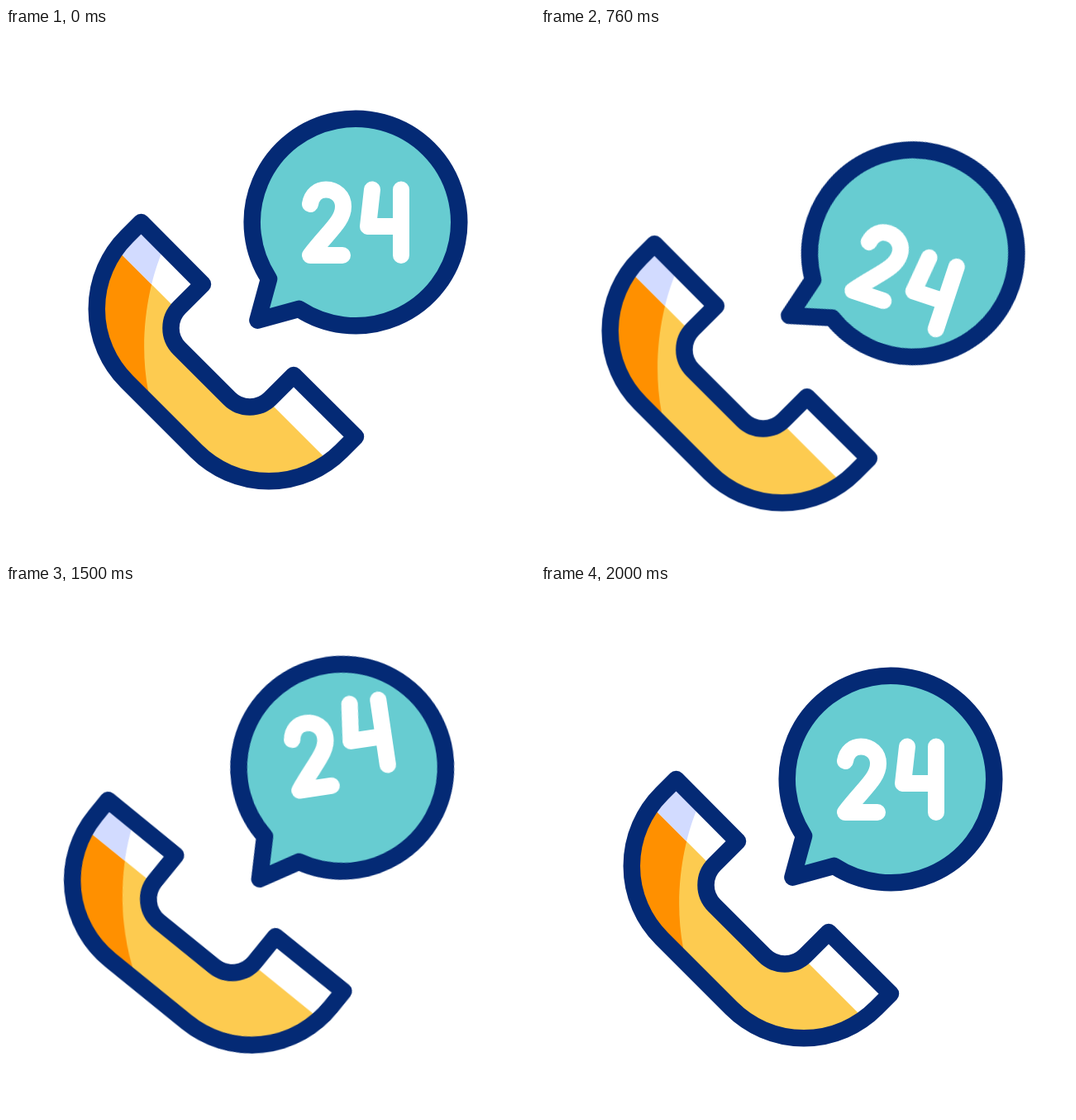
An HTML page without scripts for the animation above (2.22 s loop, 640 by 640 pixels).

```html
<!DOCTYPE html>
<html lang="en">
<head>
<meta charset="utf-8">
<title>Support around the clock</title>
<style>
  html, body { margin: 0; height: 100%; overflow: hidden; background: #fff; }
  svg { display: block; width: 100vw; height: 100vh; }

  .line {
    fill: none; stroke: #042a75; stroke-width: 20.5;
    stroke-linejoin: round; stroke-linecap: round;
  }
  .digit {
    fill: none; stroke: #fff; stroke-width: 20;
    stroke-linejoin: round; stroke-linecap: round;
  }

  .move { animation: 2220ms cubic-bezier(.333, 0, .667, 1) infinite; }
  .bubble { transform-origin: 320px 338px; animation-name: sway; }
  .two { animation-name: two; }
  .four { animation-name: four; }
  .slide { animation-name: slide; animation-timing-function: cubic-bezier(.4, 0, .6, 1); }
  .ring { transform-origin: 215px 443px; animation-name: ring; }

  @keyframes sway {
    0%, 90.09%, 100% { transform: rotate(0deg); }
    30.03% { transform: rotate(20deg); }
    60.06% { transform: rotate(-10deg); }
  }
  @keyframes two {
    0%, 81.76%, 100% { transform: translateY(0); }
    27.25% { transform: translateY(38.5px); }
    54.5% { transform: translateY(-38.5px); }
  }
  @keyframes four {
    0%, 8.33%, 90.09%, 100% { transform: translateY(0); }
    35.59% { transform: translateY(38.5px); }
    62.84% { transform: translateY(-38.5px); }
  }
  @keyframes slide {
    0%, 90.09%, 100% { transform: translate(0, 0); }
    34.23%, 54.73% { transform: translate(-26.2px, 26.2px); }
  }
  @keyframes ring {
    0%, 34.23%, 48.92%, 85.59%, 100% { transform: rotate(0deg); }
    8.33% { transform: rotate(-32deg); }
    19.6% { transform: rotate(24deg); }
    28.38% { transform: rotate(-18deg); }
    56.26% { transform: rotate(-24.5deg); }
    63.37% { transform: rotate(30deg); }
    70.95% { transform: rotate(-31deg); }
    77.7% { transform: rotate(22deg); }
  }
</style>
</head>
<body>
<svg viewBox="0 0 640 640" role="img" aria-label="Telephone receiver with a 24 speech bubble">
  <defs>
    <path id="phone" d="M163.5 235 L238 310 L209.7 338.3 A35 35 0 0 0 209.7 387.7
      L270.3 448.3 A35 35 0 0 0 319.7 448.3 L348 420 L423 494.5 L405.5 512
      A123.75 123.75 0 0 1 230.5 512 L146 427.5 A123.75 123.75 0 0 1 146 252.5 Z"/>
    <path id="caps" d="M60 194 L440 574 V194 Z"/>
    <path id="shade" d="M200 245 L190 268 C172 310 160 375 172 439 L178 460 H60 V200 H200 Z"/>
    <clipPath id="inPhone"><use href="#phone"/></clipPath>
    <clipPath id="inCaps"><use href="#caps"/></clipPath>
  </defs>

  <g class="move slide">
    <g class="move ring">
      <g clip-path="url(#inPhone)">
        <use href="#phone" fill="#fdcb50"/>
        <use href="#shade" fill="#ff9000"/>
        <use href="#caps" fill="#fff"/>
        <g clip-path="url(#inCaps)"><use href="#shade" fill="#d2dbff"/></g>
      </g>
      <use href="#phone" class="line"/>
    </g>
  </g>

  <g class="move bubble">
    <path class="line" style="fill:#67ccd1"
      d="M318.1 303.5 A125.25 125.25 0 1 1 354.5 339.9 L304.4 353.6 Z"/>
    <path class="move digit two"
      d="M368 213 C370 201 378 195.5 387 195.5 C399 195.5 408 204 408 216 C408 234 390 246 368 275 H407"/>
    <path class="move digit four" d="M443 195.5 L438 240 H478 M478 195.5 V275"/>
  </g>
</svg>
</body>
</html>
```
